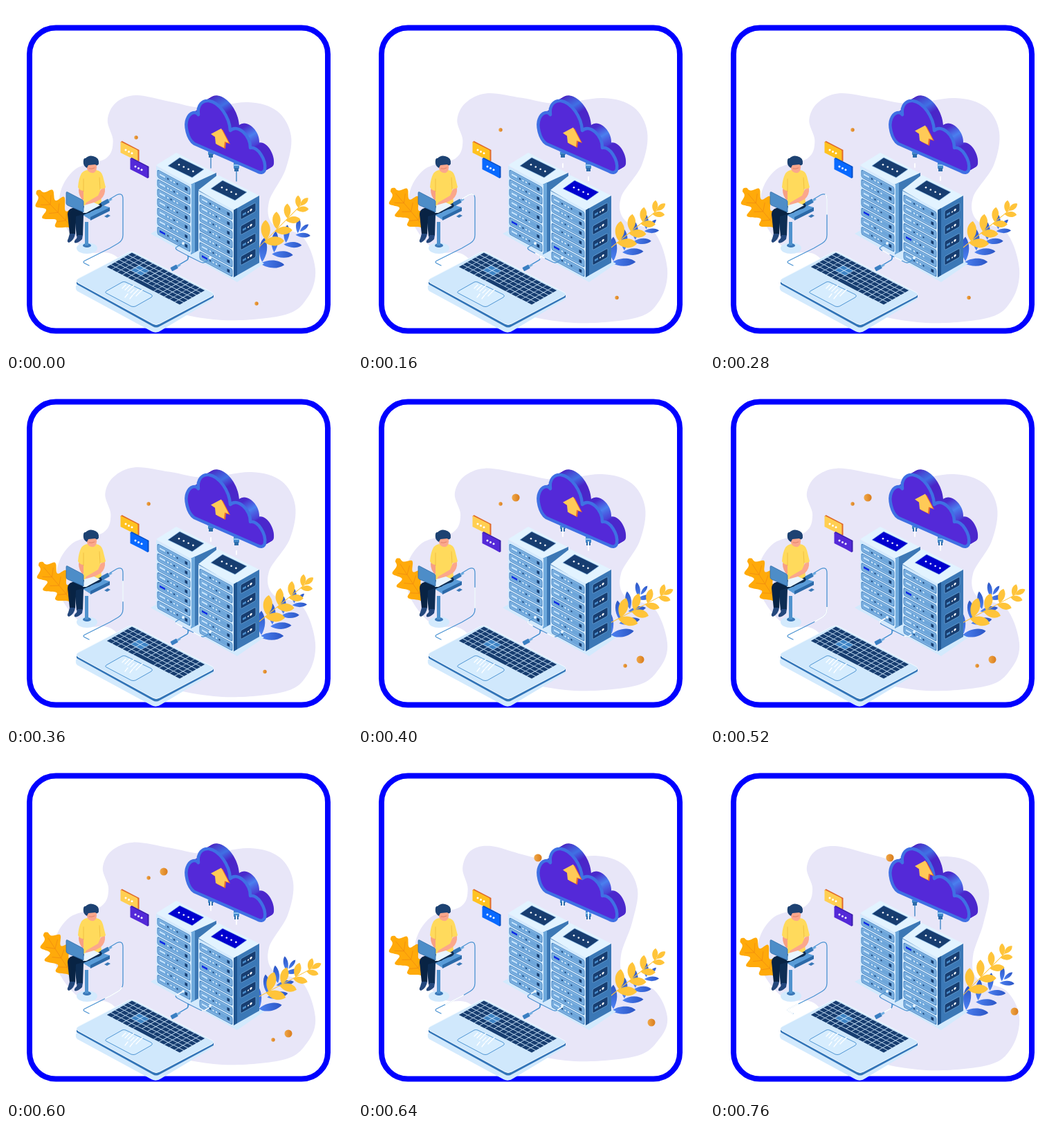
These frames come from a looping animation (500x500 px, 800 ms). An HTML page:

```html
<!DOCTYPE html>
<html lang="en">
<head>
<meta charset="utf-8">
<title>Cloud upload</title>
<style>
html, body { margin: 0; height: 100%; overflow: hidden; background: #fff; }
svg { display: block; width: 100vw; height: 100vh; }
</style>
</head>
<body>
<svg id="stage" viewBox="0 0 500 500"></svg>
<script>
const LOOP = 800;
const STEPS = [0, 160, 280, 360, 400, 440, 480, 520, 560, 640, 760];
const POSE_STARTS = [160, 400, 640, 760];
const NAVY = '#173d70', BLUE = '#4a8cca', PALE = '#d3eafd', PURPLE = '#5429d8', GOLD = '#ffc43a';

const each = (n, f) => Array.from({ length: n }, (_, i) => f(i)).join('');
const poly = (points, fill, more = '') => `<polygon points="${points}" fill="${fill}" ${more}/>`;
const path = (d, fill, more = '') => `<path d="${d}" fill="${fill}" ${more}/>`;
const line = (d, color, width, more = '') =>
  path(d, 'none', `stroke="${color}" stroke-width="${width}" stroke-linecap="round" stroke-linejoin="round" ${more}`);
const rect = (x, y, w, h, fill, more = '') =>
  `<rect x="${x}" y="${y}" width="${w}" height="${h}" fill="${fill}" ${more}/>`;
const dot = (x, y, r, fill) => `<circle cx="${x}" cy="${y}" r="${r}" fill="${fill}"/>`;
const group = (transform, body) => `<g transform="${transform}">${body}</g>`;

// Closed smooth curve through the points
function smooth(points) {
  const at = i => points.at(i % points.length);
  return `M${points[0]}` + each(points.length, i => {
    const [a, b, c, e] = [at(i - 1), at(i), at(i + 1), at(i + 2)];
    return `C${b.map((v, k) => v + (c[k] - a[k]) / 6)} ${c.map((v, k) => v - (e[k] - b[k]) / 6)} ${c}`;
  }) + 'Z';
}

const BLOB = ('145,165 157,140 187,130 237,140 285,149 348,141 390,154 410,190 402,238 380,285 386,318 428,335 ' +
  '447,380 436,419 400,445 300,451 208,425 158,362 115,354 82,315 76,272 98,236 143,220 153,195')
  .split(' ').map(p => p.split(',').map(Number));
// How far the left side leans, the upper right swells and the bottom drops
const SHIFTS = [[2, 2, 2], [-2, 8, 6], [-6, 5, -3], [7, -6, -8], [-6, -7, 5]];

function blob(pose) {
  const [lean, swell, drop] = SHIFTS[pose];
  return path(smooth(BLOB.map(([x, y]) => {
    const side = x < 250 ? lean : y < 260 ? swell : 0;
    const rise = y > 400 ? drop : y < 360 && x > 160 ? -swell * Math.min(1, (x - 130) / 120) : 0;
    return [x + side * Math.min(1, Math.abs(x - 250) / 120), y + rise];
  })), '#e8e6f8');
}

// Small beads drift up and right, then large ones take over
function beads(pose) {
  const p = Math.min(1, pose), q = pose - 2, fill = 'url(#bead)';
  return (q <= 0 ? dot(188 + 18 * p, 190 - 11 * p, 2.7, fill) + dot(362 + 12 * pose, 430 - 8.5 * pose, 2.7, fill) : '') +
    (q >= 0 ? dot(228 + 32 * Math.min(1, q), 170 - 20 * Math.min(1, q), 5.6, fill) + dot(408 + 16 * q, 404 - 16 * q, 5.5, fill) : '');
}

// Cable with a white pulse centred at the given distance
function cable(d, center, length) {
  const from = Math.max(0, center - length / 2), size = Math.max(0, center + length / 2 - from);
  return line(d, '#4b93d2', 1.3) +
    (size ? line(d, '#fff', 1.7, `stroke-dasharray="0 ${from} ${size} 999" style="stroke-linecap:butt"`) : '');
}

function branch(x, y, angle, color, fat, spread, base) {
  const leaf = (d, turn, size) => group(`translate(${d} 0) rotate(${turn})`,
    path(`M0 0C${size * .3} ${-fat * size} ${size * .8} ${-fat * size} ${size} 0C${size * .7} ${fat * size} ${size * .3} ${fat * size * .8} 0 0Z`, color));
  return group(`translate(${x} ${y}) rotate(${angle})`,
    line('M0 0H96', color, 1) +
    each(4, i => {
      const d = 17 + i * 22, size = base - i * base * .13;
      return leaf(d + 4, -spread - 4, size) + leaf(d, spread, size);
    }) + leaf(91, 0, 16));
}

function oak(angle) {
  const edge = (t, side) => {
    const lobe = .5 + .5 * Math.cos(Math.PI * (7 * t - 1.3));
    const w = 22 * Math.sin(Math.PI * t ** .9) ** .6 * (.45 + .55 * lobe);
    return [side * w, -74 * t - 5 * lobe * Math.sin(Math.PI * t)];
  };
  const outline = Array.from({ length: 56 }, (_, i) => i < 28 ? edge(i / 28, 1) : edge((56 - i) / 28, -1));
  return group(`translate(96 320) rotate(${angle})`,
    path(smooth(outline), '#ffaa0a') + line('M0 0V-64', '#f08a10', .7) +
    each(3, i => line(`M-10 ${-21 - i * 17}L0 ${-14 - i * 16}L10 ${-21 - i * 17}`, '#f08a10', .7)));
}

function cloud(tip) {
  const d = 'M272 199C262 192 258 172 262 163C266 153 274 152 278 157C276 143 284 136 293 137C308 139 323 160 324 180' +
    'C335 170 354 188 353 205C364 203 376 222 374 236C373 241 368 242 363 239Z';
  const arrow = '312,0 297,8 303,12 304,22 316,28 317,19 323,21';
  return each(14, i => path(d, 'url(#rim)', `transform="translate(${13 - i} ${(i - 13) * .58})"`)) +
    path(d, PURPLE, 'stroke="#3f70e4" stroke-width="4.5" stroke-linejoin="round"') +
    group(`translate(-1 ${tip})`, poly(arrow, '#e8692e', 'transform="translate(2 1.5)"') + poly(arrow, '#ffca57'));
}

function plugs(i) {
  const full = i === 0 || i === 6, low = i < 3;
  return [[296, 206, 234], [333, 226, 253]].map(([x, y, end]) =>
    (full ? line(`M${x} ${y + 11}V${end}`, BLUE, 1.5) : '') +
    rect(x - 4, y, 8, 9, '#4389cb') + rect(x - 3, y + 8, 6, 5, '#2d6caa') + rect(x - 4.5, y + 3, 9, 2, '#8ec4f0') +
    (full ? '' : line(low ? `M${x} ${end - 6}v5` : i < 5 ? `M${x} ${y + 8}v12` : `M${x} ${y}v14`, '#fff', 1.8))
  ).join('');
}

function bubbles(bright) {
  const one = (x, y, fill, edge) => group(`translate(${x} ${y})`,
    path('M0 1L2 -1L27 12V28L25 29Z', edge) +
    path('M0 1Q0 0 1 .5L24 12Q25 13 25 14V29L16 24L0 16Z', fill) +
    each(3, i => dot(7.5 + i * 4.5, 12 + i * 2.4, 1.5, '#fff')));
  return one(165.5, 196, bright ? '#ffc220' : '#ffcf52', '#df6a2b') +
    one(179.5, 220, bright ? '#0869ff' : PURPLE, bright ? '#0750c8' : '#3d1fae');
}

function rack(x, y, lit) {
  return group(`matrix(1 .54 0 1 ${x} ${y})`,
    rect(0, 0, 51, 98, PALE) +
    each(7, k => group(`translate(0 ${4.5 + k * 13.7})`,
      rect(2, 0, 47, 11, '#6ea6da', 'rx="2" stroke="#3a7abb" stroke-width=".8"') +
      rect(3.4, 1.4, 44.2, 8.2, 'none', 'rx="1.4" stroke="#9cc8ee" stroke-width=".6"') +
      rect(5, 3.7, 8, 2.6, k === lit ? '#0b24e8' : '#c4e2fb') +
      each(4, j => dot(17 + j * 4.5, 5.2, 1.1, (j + k) % 3 ? '#e9f6ff' : NAVY)) +
      rect(41.5, 3.3, 3.6, 4.4, NAVY))));
}

function topPlate(x, y, on) {
  return poly(`${x},${y} ${x + 17},${y - 12} ${x + 52},${y + 5} ${x + 35},${y + 17}`, on ? '#0000cf' : NAVY, 'stroke="#8bbbe6" stroke-width=".7"') +
    each(4, i => dot(x + 16 + i * 6.8, y - 1.7 + i * 3.2, 1.3, '#fff'));
}

function servers(i) {
  const lit = 6 - i;
  return poly('209,329 245,309 373,372 334,399', PALE) +
    poly('217,230 246,212 304,242 268,259', '#e2f3ff') +
    poly('267,258 304,241 304,340 267,359', '#3c78b5') + poly('267,258 273,255 273,356 267,359', '#6ea9dc') +
    rack(217, 231, lit) + topPlate(234, 231, i === 4) +
    poly('278,266 306,244 366,274 329,296', '#e2f3ff') +
    poly('329,295 366,274 366,371 329,392', '#3b78b6') + poly('329,295 334,292 334,389 329,392', '#1f5590') +
    each(4, k => group(`matrix(1 -.55 0 1 339 ${296 + k * 22})`,
      rect(0, 0, 22, 13, NAVY, 'rx="2" stroke="#6aa6da" stroke-width=".7"') +
      rect(3, 6, 5, 3, BLUE) + dot(11, 7.5, 1, '#fff') + dot(15, 7, 1.7, '#fff'))) +
    rack(278, 267, lit) + topPlate(296, 264, i === 1 || i === 4);
}

function person() {
  return '<ellipse cx="117" cy="350" rx="15" ry="8" fill="#d3eafd"/><ellipse cx="117" cy="346" rx="6" ry="3" fill="#3a78b8"/>' +
    rect(114, 312, 5, 34, '#4f92ce') +
    poly('111,302 140,288 150,291 150,296 122,309', '#5a9cd8') + poly('122,305 150,291 150,296 122,310', '#2c69a8') +
    path('M140 285Q140 292 130 294L112 302L111 332L102 333L99 303Q99 296 106 292L125 284Z', '#0d2d54') +
    path('M118 287L96 292Q89 294 89 301L92 330L100 330L101 304L122 298Z', '#082344') +
    path('M92 329L100 329Q99 338 91 342Q87 341 90 336ZM103 331L111 331L110 337Q103 344 99 342Q98 339 102 336Z', '#24477c') +
    path('M107 258L105 266Q105 274 111 281L114 277L112 262Z', '#f7a083') +
    path('M119 236H129V243Q124 248 118 241Z', '#f08f72') +
    path('M109 242Q113 237 119 237Q124 244 130 237Q138 238 140 246L144 262Q141 266 136 264L138 284Q125 293 112 289V267Q107 267 104 262Q105 249 109 242Z', '#ffda5c') +
    line('M112 250V268M135 248L136 265', '#edb93d', .8) +
    path('M117 228H131Q132 239 127 241Q119 242 117 235Z', '#fba78c') +
    path('M112 228Q111 219 115 220Q120 215 126 217Q135 219 134 228Q132 232 129 229L119 230L117 234Q113 232 112 228Z', '#1d4272') +
    line('M120 235Q124 236 128 234', '#dd7b65', .9) +
    path('M137 265L143 263Q144 273 137 279L119 289L114 288L116 284L133 274Z', '#fba78c') +
    poly('111,299 113,288 127,284 136,288 116,299', '#e9f5ff') +
    path('M87 270Q87 268 89 269L110 280Q112 281 112 283L112 298L89 288Q87 287 87 285Z', '#4d8dc8', 'stroke="#2f6dab" stroke-width=".8"') +
    group('translate(145 283) rotate(-28)', rect(-8, -3, 12, 6, '#3477b8', 'rx="1"') + rect(4, -1.5, 5, 3, '#75b0e2')) +
    poly('142,304 147,301 151,303 146,306', '#3a78b8');
}

function laptop() {
  return path('M101 404L112 400L218 450L300 421L299 424L224 469Q217 474 210 470L103 412Q100 409 101 404Z', PALE) +
    path('M102 396V402L212 463Q217 466 222 463L300 421V416Z', '#3375b8') +
    path('M104 394L177 356Q181 354 186 356L298 414Q302 416 298 419L222 459Q217 462 212 459L104 400Q100 397 104 394Z', '#d0e8fc', 'stroke="#f2faff" stroke-width="1"') +
    group('matrix(106 55 -37 21 182 356)',
      each(6, r => each(14, c => r === 5 && c > 4 && c < 9 ? '' :
        rect((c + .05) / 14, (r + .07) / 6, .064, .143, r > 1 && r < 4 && c > 2 && c < 5 ? '#3e83c4' : NAVY))) +
      rect(5.05 / 14, 5.07 / 6, .278, .143, NAVY)) +
    path('M145 412L168 399Q170 398 173 399L210 417Q213 419 210 421L187 434Q184 435 181 434L145 415Q142 414 145 412Z', '#d7edfe', 'stroke="#4f95d3" stroke-width="1"') +
    each(6, i => line(`M${168 + i * 4} ${408 + i * 2.2}l${5 + i % 3 * 2} ${-5 - i % 3 * 2}`, '#fff', 1.3)) +
    each(2, i => line(`M${172 + i * 7} ${421 + i * 2}l4 -5`, '#fff', 1.3));
}

const defs = `<defs>
  <linearGradient id="rim" gradientUnits="userSpaceOnUse" x1="262" y1="150" x2="374" y2="225">
    <stop offset=".1" stop-color="#4a26c4"/><stop offset=".27" stop-color="#4070e4"/><stop offset=".36" stop-color="#4a25c8"/>
    <stop offset=".58" stop-color="#4a2acc"/><stop offset=".7" stop-color="#4a80ee"/><stop offset=".82" stop-color="#4b27cc"/>
  </linearGradient>
  <linearGradient id="bead"><stop offset="0" stop-color="#f0a848"/><stop offset="1" stop-color="#d97c1c"/></linearGradient>
  <linearGradient id="fern"><stop offset="0" stop-color="#4d82f2"/><stop offset="1" stop-color="#2b55c5"/></linearGradient>
</defs>`;

function scene(s) {
  const i = Math.max(0, Math.floor((s - 40) / 120));
  const pose = POSE_STARTS.filter(v => v <= s).length;
  const sway = 17 * Math.sin(pose * Math.PI / 4) ** 3;
  const tip = 177 - 23 * (i / 6) ** 1.5;
  const pulse = 5 + (s - 160) * .235;
  const short = s ? (22 + (s - 160) * .066) % 54 : -99;
  return defs +
    rect(34, 31.4, 431, 438.2, '#fff', 'rx="38" stroke="#00f" stroke-width="8"') +
    blob(pose) + beads(pose) +
    oak(-44 + sway * .65) +
    branch(354, 383, -39 - sway * .83, 'url(#fern)', .22, 42, 35) +
    branch(361, 353, -45 + sway, GOLD, .32, 42, 29) +
    person() +
    cable('M150 279L160 273Q169 269 169 279V331Q169 339 162 343L150 350L114 368Q110 370 114 372L120 375', pulse, 30) +
    servers(i) +
    cable('M250 374L262 367Q264 365 263 361L248 353Q243 350 247 348L256 343', short, 12) +
    cable('M250 374L262 367Q264 365 263 361L281 370Q285 372 288 370L296 365', short, 12) +
    dot(256, 343, 2, '#e9f6ff') + dot(295, 364, 2, '#e9f6ff') +
    group('translate(244 378) rotate(-28)', rect(-6, -3, 10, 6, '#3a7fc2', 'rx="1"') + rect(4, -1.5, 5, 3, '#75b0e2')) +
    bubbles(pose % 2) + plugs(i) + cloud(tip) + laptop();
}

const stage = document.getElementById('stage');
let shown = -1;
function tick(now) {
  const t = now % LOOP;
  const step = STEPS.findLast(v => v <= t);
  if (step !== shown) stage.innerHTML = scene(shown = step);
  requestAnimationFrame(tick);
}
tick(performance.now());
</script>
</body>
</html>
```
